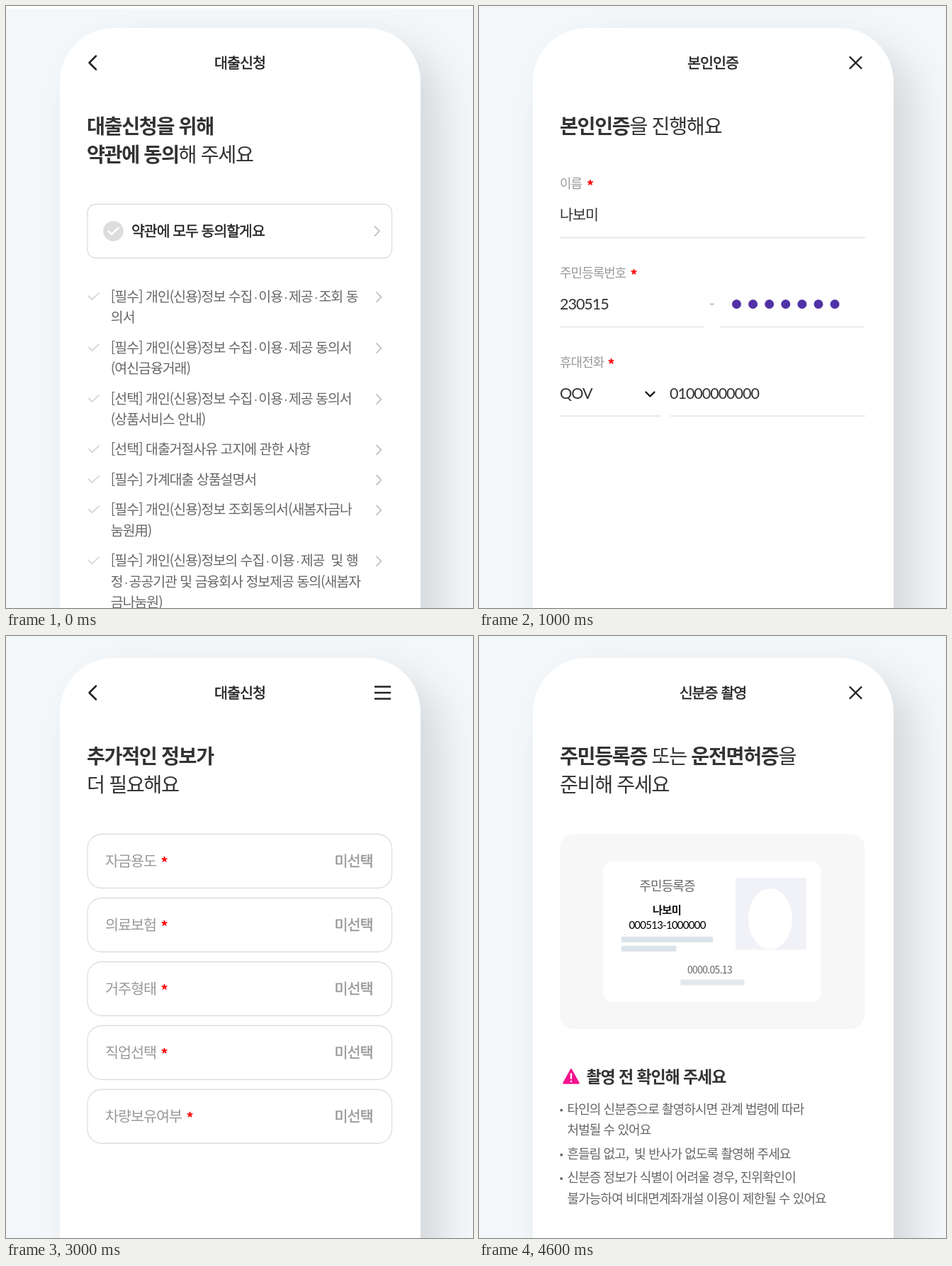
Animation, 659 px wide and 849 px high, one loop 5 s. Source, as an HTML page:

```html
<!DOCTYPE html>
<html lang="ko">
<head>
<meta charset="utf-8">
<title>대출신청</title>
<style>
  html, body { margin: 0; width: 100%; height: 100%; overflow: hidden; background: #f3f7fa; }
  #view { position: relative; width: 100%; height: 100%; overflow: hidden; contain: strict; }
  #phone {
    position: absolute; left: 76px; top: 31px; width: 509px; bottom: -100px;
    border-radius: 76px; background: #fff;
    box-shadow: 28px 28px 56px rgba(0, 0, 0, .125);
  }
  svg { position: absolute; left: 0; top: 0; width: 100%; height: 100%; display: block; }
  text { font-family: "Noto Sans CJK KR", "Noto Sans CJK", sans-serif; letter-spacing: -.05em; white-space: pre; }
  .latin { font-family: Lato, sans-serif; }
  .dot { font-family: "Noto Sans Mono", monospace; font-size: .85em; }
</style>
</head>
<body>
<div id="view">
  <div id="phone"></div>
  <svg id="stage" viewBox="0 0 659 849"></svg>
</div>
<script>
const SCENE_MS = 1000;

// Text is placed by the vertical centre of its Hangul glyphs; a thin stroke gives a medium weight.
const text = (x, y, str, { size = 20.7, weight = 400, medium = false, fill = '#333', anchor = 'start', cls = '' } = {}) =>
  `<text x="${x}" y="${y + size * .37}" font-size="${size}" font-weight="${weight}" fill="${fill}"
    stroke="${medium ? fill : 'none'}" stroke-width=".45" text-anchor="${anchor}"
    class="${cls}">${str.replace(/·/g, '<tspan class="dot">·</tspan>')}</text>`;
const bold = str => `<tspan font-weight="700">${str}</tspan>`;
const line = (d, stroke, width, cap = 'round') =>
  `<path d="${d}" fill="none" stroke="${stroke}" stroke-width="${width}" stroke-linecap="${cap}" stroke-linejoin="round"/>`;
const rect = (x, y, w, h, fill, rx = 0, stroke = 'none') =>
  `<rect x="${x}" y="${y}" width="${w}" height="${h}" rx="${rx}" fill="${fill}" stroke="${stroke}" stroke-width="1.3"/>`;

const title = str => text(330, 80, str, { medium: true, fill: '#222', anchor: 'middle' });
const headline = (...lines) => lines.map((str, i) => text(114, 170 + i * 40, str, { size: 28.3 })).join('');
const back = line('M127 70.5L117.5 80L127 89.5', '#222', 2.5);
const close = line('M523.5 72L539.5 88M539.5 72L523.5 88', '#222', 2.4);
const menu = line('M520 71.5H543M520 80H543M520 88.5H543', '#222', 2.4, 'butt');
const star = (x, y) => text(x, y + 4.2, '*', { size: 20, weight: 700, fill: '#f00', anchor: 'middle' });
const chevron = (x, y) => line(`M${x} ${y - 6.5}l6.5 6.5l-6.5 6.5`, '#c4c4c4', 1.8);
const tick = (x, y, color, width) => line(`M${x - 7} ${y}l4.5 4.5l9.5 -9`, color, width);
const box = (y, radius) => rect(115, y - 38, 429.5, 76, '#fff', radius, '#ddd');
const underline = (x1, x2, y) => line(`M${x1} ${y}H${x2}`, '#ececec', 2.6, 'butt');

function termsScene() {
  const terms = [
    [409.5, '[필수] 개인(신용)정보 수집·이용·제공·조회 동', '의서'],
    [481.5, '[필수] 개인(신용)정보 수집·이용·제공 동의서', '(여신금융거래)'],
    [553.5, '[선택] 개인(신용)정보 수집·이용·제공 동의서', '(상품서비스 안내)'],
    [625, '[선택] 대출거절사유 고지에 관한 사항'],
    [667.5, '[필수] 가계대출 상품설명서'],
    [710, '[필수] 개인(신용)정보 조회동의서(새봄자금나', '눔원用)'],
    [782, '[필수] 개인(신용)정보의 수집·이용·제공  및 행', '정·공공기관 및 금융회사 정보제공 동의(새봄자', '금나눔원)'],
  ];
  const rows = terms.map(([y, ...lines]) =>
    tick(124, y, '#d9d9d9', 2) + chevron(523, y + 1) +
    lines.map((str, i) => text(147.8, y + i * 29.6, str, { size: 19.37, fill: '#666' })).join(''));
  return rect(0, 0, 659, 3.5, '#fff') + back + title('대출신청') +
    headline(bold('대출신청을 위해'), bold('약관에 동의') + '해 주세요') +
    box(317.5, 12) + '<circle cx="151.5" cy="317.5" r="14.3" fill="#ddd"/>' +
    tick(151.5, 317.5, '#fff', 2.6) +
    text(177, 317.5, '약관에 모두 동의할게요', { size: 20.5, medium: true, fill: '#222' }) +
    chevron(520.5, 317.5) + rows.join('');
}

function identityScene() {
  const label = (y, str, starX) => text(114, y, str, { size: 17.9, fill: '#999' }) + star(starX, y - 1);
  const value = (x, y, str) => text(x, y, str, { size: 21.6, cls: 'latin' });
  const dots = Array.from({ length: 7 }, (_, i) =>
    `<circle cx="${363.5 + i * 23.1}" cy="420.5" r="6.5" fill="#5132a6"/>`).join('');
  return title('본인인증') + close + headline(bold('본인인증') + '을 진행해요') +
    label(250.5, '이름', 156.5) + text(114, 294, '나보미') + underline(114, 545, 326.5) +
    label(376.5, '주민등록번호', 218) + value(114, 420.5, '230515') +
    line('M326 420.5H331.5', '#bbb', 2, 'butt') + dots +
    underline(114, 317.5, 452.5) + underline(340, 543, 452.5) +
    label(502.5, '휴대전화', 186) + value(114, 546.5, 'QOV') +
    line('M235.5 544.5L241.5 550.5L247.5 544.5', '#111', 2.4) +
    value(269, 546.5, '01000000000') +
    underline(114, 257, 578.3) + underline(270, 545, 578.3);
}

const optionRows = (labels, medium, starAt = () => '') => labels.map((str, i) => {
  const y = 317.5 + i * 90;
  return box(y, 20) + text(140, y, str, { fill: '#999' }) + starAt(str, y) +
    text(463.5, y, '미선택', { fill: '#999', medium });
}).join('');

function suitabilityScene() {
  return back + title('대출신청') + headline(bold('적합성·적정성 정보') + '를', '확인할게요') +
    optionRows(['연령', '대출목적', '연간소득', '총자산(순자산)', '부채', '신용점수', '변제방법'], false);
}

function extraScene() {
  return back + title('대출신청') + menu + headline(bold('추가적인 정보가'), '더 필요해요') +
    optionRows(['자금용도', '의료보험', '거주형태', '직업선택', '차량보유여부'], true,
      (str, y) => star(151 + str.length * 18, y - 2));
}

function idCardScene() {
  const middle = { anchor: 'middle' };
  const notes = [
    [667, '타인의 신분증으로 촬영하시면 관계 법령에 따라', '처벌될 수 있어요'],
    [730, '흔들림 없고,  빛 반사가 없도록 촬영해 주세요'],
    [763.5, '신분증 정보가 식별이 어려울 경우, 진위확인이', '불가능하여 비대면계좌개설 이용이 제한될 수 있어요'],
  ].map(([y, ...lines]) => rect(114.5, y, 3.5, 3.5, '#666', 1) +
    lines.map((str, i) => text(124.5, y + i * 29.6, str, { size: 18, fill: '#666' })).join('')).join('');
  const card = rect(114, 279, 430.5, 275, '#f7f7f7', 20) + rect(175, 318, 308, 198, '#fff', 14) +
    text(265.5, 352, '주민등록증', { ...middle, size: 18, fill: '#666' }) +
    text(265, 386.5, '나보미', { ...middle, size: 15.3, weight: 700, fill: '#111' }) +
    text(265.5, 407.5, '000513-1000000', { ...middle, size: 15, fill: '#000', cls: 'latin' }) +
    rect(201, 424, 129, 8, '#dbe2ea', 1) + rect(201, 437, 77.5, 8, '#dbe2ea', 1) +
    text(325.5, 471, '0000.05.13', { ...middle, size: 14, fill: '#666' }) +
    rect(284.5, 484.5, 90, 8, '#e3e8ee', 1) +
    rect(362, 341, 100, 101.5, '#f1f1f8', 4) +
    '<ellipse cx="411" cy="399" rx="31" ry="43" fill="#fff"/>';
  const warning = '<path d="M130 611.5L140.5 630.5H119.5Z" fill="#f5128f" stroke="#f5128f" stroke-width="2.5" stroke-linejoin="round"/>' +
    line('M130 617.5V624M130 628V628.2', '#fff', 2.3);
  return title('신분증 촬영') + close +
    headline(bold('주민등록증') + ' 또는 ' + bold('운전면허증') + '을', '준비해 주세요') +
    card + warning + text(151.5, 621, '촬영 전 확인해 주세요', { size: 23.1, weight: 700 }) + notes;
}

const stage = document.getElementById('stage');
stage.innerHTML = [termsScene, identityScene, suitabilityScene, extraScene, idCardScene]
  .map(scene => `<g>${scene()}</g>`).join('');
const scenes = [...stage.children];

function render(ms) {
  const current = Math.floor(ms / SCENE_MS) % scenes.length;
  scenes.forEach((g, i) => g.setAttribute('display', i === current ? 'inline' : 'none'));
}

const start = performance.now();
function animate() {
  render(performance.now() - start);
  requestAnimationFrame(animate);
}
animate();
</script>
</body>
</html>
```
